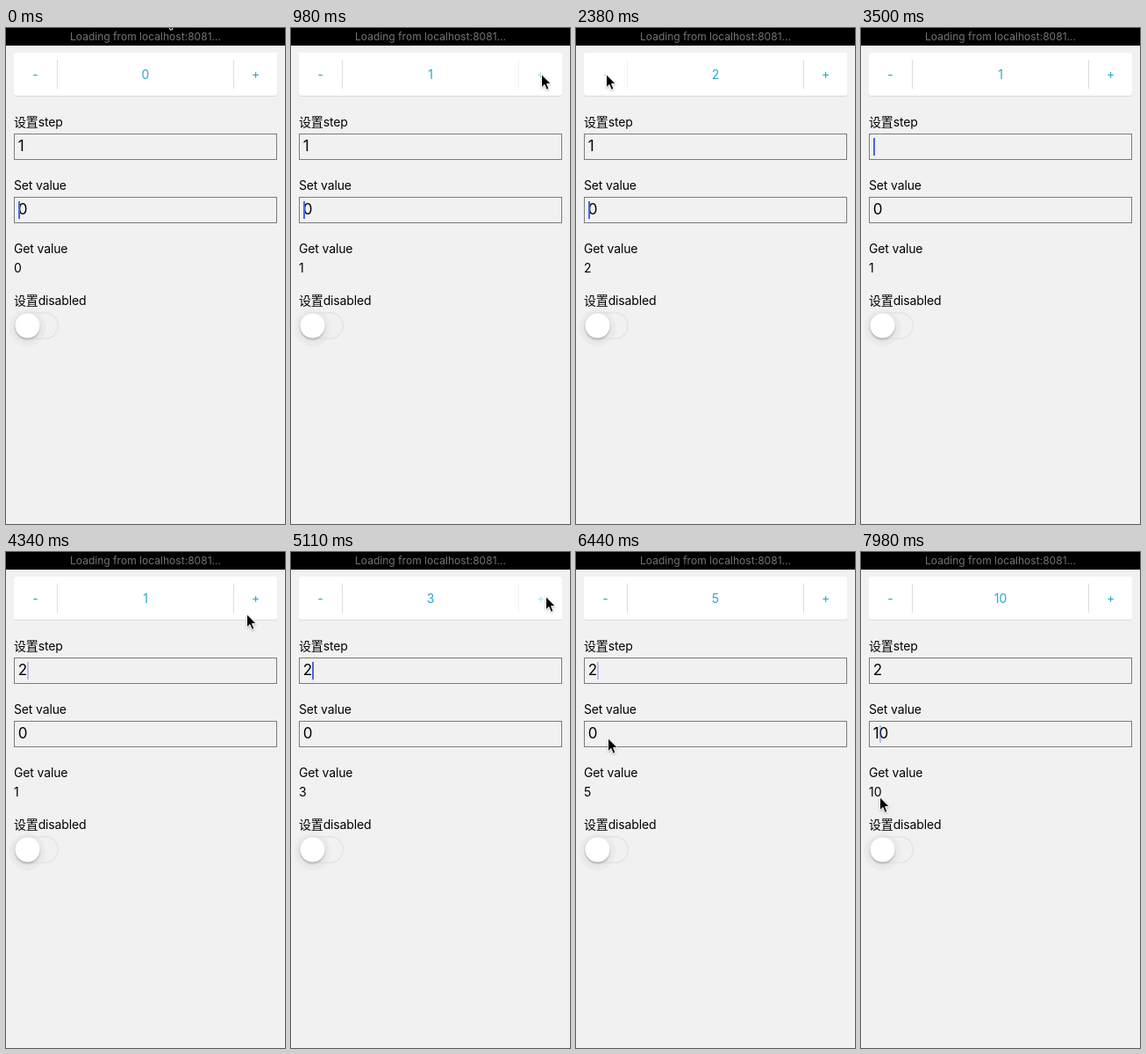
Animation of 318x564 px, one loop 8 s. Source, as an HTML page:

```html
<!DOCTYPE html>
<html lang="zh">
<head>
<meta charset="utf-8">
<title>Stepper demo</title>
<style>
  html, body { margin: 0; width: 100%; height: 100%; overflow: hidden; background: #f1f1f1; }
  svg { display: block; width: 318px; height: 564px; }
  text { font: 14px Inter, "Noto Sans CJK SC", "Noto Sans CJK", sans-serif; fill: #000; }
  .label { letter-spacing: -.15px; }
  .status { font-size: 12px; letter-spacing: .03px; fill: #747474; }
  .mid { text-anchor: middle; }
  .accent { fill: #25a9c8; }
  .input { font-size: 17px; }
  .box { fill: none; stroke: #7b7b7b; }
  .rule { stroke: #dcdcdc; }
  #knob { filter: drop-shadow(0 2px 1px rgba(0,0,0,.2)) drop-shadow(0 2px 4px rgba(0,0,0,.06)); }
  #pointer { filter: drop-shadow(0 1px 1px rgba(0,0,0,.25)); }
</style>
</head>
<body>
<svg viewBox="0 0 318 564">
  <rect width="318" height="564" fill="#f1f1f1"/>
  <rect width="318" height="20" fill="#000"/>
  <text class="status mid" x="159" y="13.5">Loading from localhost:8081...</text>

  <rect x="9" y="29" width="300" height="49" rx="3" fill="#dadada"/>
  <rect x="9" y="28" width="300" height="49" rx="3" fill="#fff"/>
  <g id="minus">
    <path class="rule" d="M58.5 36V69"/>
    <text class="mid accent" x="33.5" y="57.5">-</text>
  </g>
  <text id="count" class="mid accent" x="159" y="57.6">0</text>
  <g id="plus">
    <path class="rule" d="M259.5 36V69"/>
    <text class="mid accent" x="284.7" y="57">+</text>
  </g>

  <text class="label" x="9" y="112">设置step</text>
  <rect class="box" x="9.5" y="120.5" width="299" height="29"/>
  <text id="step" class="input" x="13.7" y="140">1</text>

  <text class="label" x="9" y="184">Set value</text>
  <rect class="box" x="9.5" y="192.5" width="299" height="29"/>
  <text id="value" class="input" x="13.7" y="212">0</text>

  <text class="label" x="9" y="256">Get value</text>
  <text id="result" x="9" y="278">0</text>

  <text class="label" x="9" y="315">设置disabled</text>
  <circle cx="24.5" cy="341" r="21" fill="#000" opacity=".02"/>
  <rect x="9.7" y="323.7" width="49.6" height="29.6" rx="14.8" fill="none" stroke="#e4e4e4" stroke-width="1.4"/>
  <circle id="knob" cx="24.5" cy="338.5" r="14" fill="#fff"/>

  <rect id="caret" width="2" height="20" fill="#4468e0"/>
  <path id="pointer" d="M.5 .8V15.8L4 12.5 6.3 18.3 9 17.2 6.6 11.6H11.3Z" fill="#000" stroke="#fff"/>
</svg>
<script>
const LOOP = 8000, TICK = 70;
const $ = id => document.getElementById(id);
const burst = (at, n, gap) => Array.from({ length: n }, (_, i) => at + i * gap);

const taps = {
  plus: [...burst(770, 4, 210), ...burst(4760, 3, 350)],
  minus: [...burst(1960, 3, 210), 5950]
};

// Focus, arrow keys and typing; pos is the caret's place in the text
const edits = [
  { at: -140, id: "value", text: "0", pos: 0 },
  { at: 2870, id: "step", text: "1", pos: 1 },
  { at: 3500, id: "step", text: "", pos: 0 },
  { at: 3710, id: "step", text: "2", pos: 1 },
  { at: 6650, id: "value", text: "0", pos: 1 },
  { at: 7140, id: "value", text: "0", pos: 0 },
  { at: 7350, id: "value", text: "10", pos: 1 }
];

const origin = { x: 181, y: -16 };
const moves = [
  { from: 0, to: 420, x: 281, y: 52 },
  { from: 770, to: 840, x: 285, y: 52 },
  { from: 1470, to: 1750, x: 34, y: 52 },
  { from: 2450, to: 2660, x: 28, y: 130 },
  { from: 3990, to: 4340, x: 274, y: 70 },
  { from: 4340, to: 4550, x: 290, y: 50 },
  { from: 5530, to: 5740, x: 16, y: 55 },
  { from: 5740, to: 5880, x: 32, y: 52 },
  { from: 6160, to: 6440, x: 36, y: 211 },
  { from: 7770, to: 7980, x: 21, y: 278 }
];

const textOf = (id, t) => edits.findLast(e => e.id === id && e.at <= t)?.text ?? "1";

// Each tap counts one tick after the press, by the step set at that time
function countAt(t) {
  const typed = edits.at(-1);
  if (t >= typed.at) return +typed.text;
  const total = list => list.filter(at => at + TICK <= t)
    .reduce((sum, at) => sum + +textOf("step", at), 0);
  return total(taps.plus) - total(taps.minus);
}

function pointerAt(t) {
  let { x, y } = origin;
  for (const m of moves) {
    const p = Math.min(1, Math.max(0, (t - m.from) / (m.to - m.from)));
    const ease = p * p * (3 - 2 * p);
    x += (m.x - x) * ease;
    y += (m.y - y) * ease;
  }
  return { x, y };
}

// Solid, then one faint tick, then off
function blink(age) {
  const phase = age % 1050;
  return phase < 630 ? 1 : phase < 700 ? .35 : 0;
}

function draw(time) {
  const t = Math.floor(time % LOOP / TICK) * TICK;
  $("count").textContent = $("result").textContent = countAt(t);
  for (const id of ["step", "value"]) $(id).textContent = textOf(id, t);
  for (const id in taps) $(id).style.opacity = taps[id].includes(t) ? .35 : 1;

  const { at, id, pos } = edits.findLast(e => e.at <= t);
  const field = $(id), caret = $("caret");
  const offset = pos ? field.getSubStringLength(0, pos) : 0;
  caret.setAttribute("x", Math.round(13.7 + offset));
  caret.setAttribute("y", field.getAttribute("y") - 15);
  caret.style.opacity = blink(t - at);

  // The pointer hides while keys are in use
  const { x, y } = pointerAt(t), pointer = $("pointer");
  const typing = t >= 3010 && t < 3990 || t >= 7280 && t < 7840;
  pointer.setAttribute("transform", `translate(${x} ${y})`);
  pointer.style.opacity = typing ? 0 : 1;
}

const start = performance.now();
function frame() {
  draw(performance.now() - start);
  requestAnimationFrame(frame);
}
frame();
</script>
</body>
</html>
```
